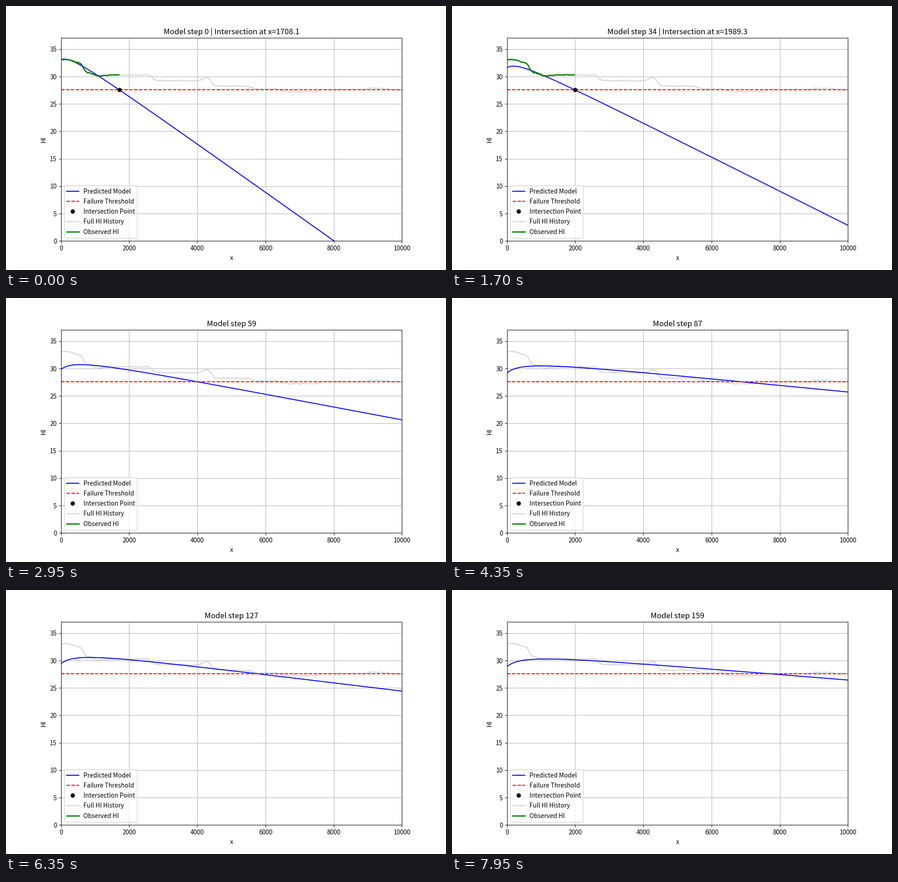
These frames come from a looping animation (966x580 px, 8 s). A matplotlib script:

```python
import numpy as np
import matplotlib.pyplot as plt
from matplotlib.animation import FuncAnimation
from matplotlib.lines import Line2D
from matplotlib.patches import FancyBboxPatch
from matplotlib.transforms import IdentityTransform

W, H, DPI = 966, 580, 96
K = W / 10 / DPI   # scales point sizes to a plot 10 inches wide
FRAMES, INTERVAL = 160, 50
LIMIT = 27.58      # failure threshold
MAX_HIT = 2000     # crossings beyond this are not reported

plt.rcParams.update({
    "font.family": "Noto Sans CJK JP",
    "font.size": 10.2,
    "axes.titlesize": 12.6,
    "axes.linewidth": 0.8 * K,
    "grid.linewidth": 0.8 * K,
})

# Fits at key steps: where the curve meets the threshold, decline per 1000
STEPS = [0, 17, 18, 34, 59, 87, 127, 159]
HITS = [1708.1, 1600, 1651.6, 1989.3, 4010, 6900, 5775, 7730]
SLOPES = [4.428, 4.36, 4.205, 3.125, 1.185, 0.616, 0.767, 0.513]

# Where the health history shifts, and by how much
SHIFTS = [(350, -0.5), (650, -1.9), (950, -0.6), (1330, 0.2), (2680, -1.05),
          (4150, 0.6), (4420, -1.6), (5600, -0.5), (6450, -0.5),
          (7550, 0.35), (8900, 0.25), (9600, -0.25)]

x = np.linspace(0, 10000, 1001)


def health():
    """Level that falls and recovers in soft steps, with slight noise."""
    level = 33.1 + sum(d / 2 * (1 + np.tanh((x - c) / 80)) for c, d in SHIFTS)
    noise = np.random.default_rng(4).normal(0, 0.08, x.size)
    return level + np.convolve(noise, np.ones(5) / 5, "same")


def ease(step, values):
    """Geometric interpolation between the key steps."""
    return np.exp(np.interp(step, STEPS, np.log(values)))


def model(step):
    """Linear decline with an initial dip that fades out."""
    hit, slope = ease(step, HITS), ease(step, SLOPES)
    depth = 2.85 - 0.085 * slope
    width = max(350, 510 - 50 * slope)

    def shape(t):
        return -slope * t / 1000 - depth / (1 + t / width)

    return LIMIT + shape(x) - shape(hit), hit


fig, ax = plt.subplots(figsize=(W / DPI, H / DPI), dpi=DPI)
fig.subplots_adjust(left=0.125, right=0.9, bottom=0.11, top=0.88)
ax.set_xlim(0, 10000)
ax.set_ylim(0, 37.1)
ax.set_xticks(range(0, 10001, 2000))
ax.set_yticks(range(0, 36, 5))
ax.tick_params(axis="x", pad=12.1)
for label in ax.get_xticklabels():
    label.set_va("baseline")
ax.grid(True)
title = ax.set_title("")

STYLES = {
    "Predicted Model": dict(color="blue", lw=1.5 * K),
    "Failure Threshold": dict(color="red", lw=1.5 * K, ls="--"),
    "Intersection Point": dict(color="black", marker="o", ls="", ms=6 * K),
    "Full HI History": dict(color="lightgray", lw=1.5 * K),
    "Observed HI": dict(color="green", lw=2 * K),
}
history = health()
ax.plot(x, history, **STYLES["Full HI History"])
curve, = ax.plot([], [], **STYLES["Predicted Model"])
ax.plot([0, 10000], [LIMIT, LIMIT], **STYLES["Failure Threshold"])
observed, = ax.plot([], [], **STYLES["Observed HI"])
point, = ax.plot([], [], **STYLES["Intersection Point"])

PX = IdentityTransform()


def px_text(left, top, text, **kw):
    fig.text(left, H - top, text, transform=PX, va="baseline", **kw)


def draw_legend():
    fig.add_artist(FancyBboxPatch(
        (131, H - 507.5), 154.5, 110, transform=PX,
        boxstyle="round,pad=2.7,rounding_size=2.7",
        fc=(1, 1, 1, 0.8), ec=(0.8, 0.8, 0.8, 0.8), lw=K))
    for i, (name, style) in enumerate(STYLES.items()):
        row = 407 + 22.2 * i
        xs = [146] if "marker" in style else [133, 159.8]
        fig.add_artist(Line2D(xs, [H - row] * len(xs), transform=PX, **style))
        px_text(170, row + 4.8, name)


draw_legend()
px_text(495, 557.5, "x", ha="center")
px_text(86.5, 293.5, "HI", ha="center", rotation=90, rotation_mode="anchor")


def update(step):
    y, hit = model(step)
    curve.set_data(x, y)
    text = f"Model step {step}"
    seen = np.zeros(x.size, bool)
    marks = []
    if hit < MAX_HIT:
        text += f" | Intersection at x={hit:.1f}"
        seen = x <= hit
        marks = [hit]
    observed.set_data(x[seen], history[seen])
    point.set_data(marks, [LIMIT] * len(marks))
    title.set_text(text)
    return curve, observed, point, title


anim = FuncAnimation(fig, update, frames=FRAMES, interval=INTERVAL,
                     repeat=True, repeat_delay=0, blit=False)
plt.show()
```
